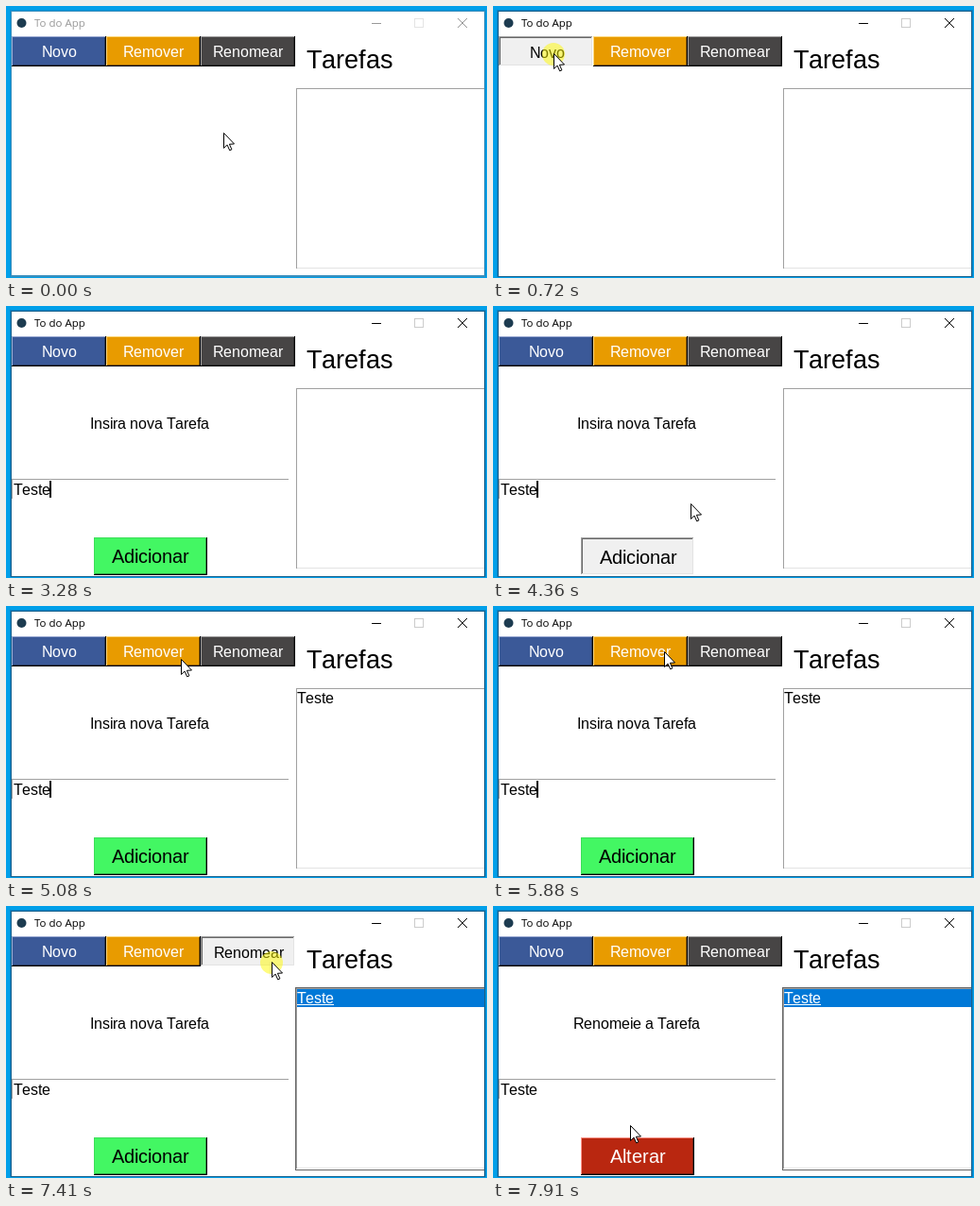
Animation of 509x288 px, one loop 8000 ms. Source, as an HTML page with a canvas:

```html
<!DOCTYPE html>
<html lang="pt">
<head>
<meta charset="utf-8">
<title>To do App</title>
<style>
html, body { margin: 0; width: 100%; height: 100%; overflow: hidden; background: #009fe9; }
canvas { display: block; width: 509px; height: 288px; }
</style>
</head>
<body>
<canvas id="stage" width="509" height="288"></canvas>
<script>
const ctx = document.getElementById('stage').getContext('2d');
const LOOP = 8000, TICK = 101.4;
const SANS = '"Liberation Sans", Arial, sans-serif';
const TITLE = '"Open Sans", "Noto Sans", sans-serif';

// All times below are in ticks
const CLICK = { add: 6, entry: 13, confirm: 42, list: 66, rename: 73 };
const TYPING = 22;
const HOME = { x: 230, y: 134 };
const MOVES = [
  { from: 0, to: 5, x: 64, y: 50 },
  { from: 8, to: 12, x: 150, y: 197 },
  { from: 30, to: 39, x: 188, y: 257 },
  { from: 42, to: 54, x: 181, y: 48, bow: 34 },
  { from: 58, to: 62, x: 259, y: 53 },
  { from: 62, to: 65, x: 330, y: 96 },
  { from: 67, to: 70, x: 281, y: 59 },
  { from: 74, to: 78, x: 145, y: 232 }
];

const within = (v, a, b) => v >= a && v <= b;
const clamp = (v, a, b) => Math.min(b, Math.max(a, v));
const easeOut = u => 1 - (1 - u) ** 3;
const isPressed = (k, click) => within(k, click, click + 1);
const isDone = (k, click) => k >= click + 2;

function pointer(k) {
  let { x, y } = HOME, resting = true;
  for (const m of MOVES) {
    if (k <= m.from) break;
    const u = clamp((k - m.from) / (m.to - m.from), 0, 1);
    const e = easeOut(u);
    x += (m.x - x) * e + (m.bow || 0) * Math.sin(Math.PI * e);
    y += (m.y - y) * e;
    resting = u === 1;
  }
  return { x: Math.round(x), y: Math.round(y), resting };
}

function rect(x, y, w, h, color) {
  ctx.fillStyle = color;
  ctx.fillRect(x, y, w, h);
}

function corner(x, y, w, h, topLeft, bottomRight) {
  rect(x, y, w, 1, topLeft);
  rect(x, y, 1, h, topLeft);
  rect(x, y + h - 1, w, 1, bottomRight);
  rect(x + w - 1, y, 1, h, bottomRight);
}

// Whole-pixel advances, as in hinted screen text
function advances(str, size) {
  const bias = size < 18 ? .3 : 0;
  ctx.font = `${size}px ${SANS}`;
  return [...str].map(c => Math.round(ctx.measureText(c).width - bias));
}

const textWidth = (str, size) => advances(str, size).reduce((a, b) => a + b, 0);

function text(str, x, y, size, color = '#000') {
  const steps = advances(str, size);
  ctx.fillStyle = color;
  [...str].forEach((c, i) => {
    ctx.fillText(c, x, y);
    x += steps[i];
  });
}

function centred(str, cx, y, size, color) {
  text(str, Math.round(cx - textWidth(str, size) / 2), y, size, color);
}

function disc(x, y, r, color) {
  ctx.fillStyle = color;
  ctx.beginPath();
  ctx.arc(x, y, r, 0, Math.PI * 2);
  ctx.fill();
}

// Bevel highlight: very bright faces get a darker edge, others a lighter one
function highlight(face) {
  const rgb = [1, 3, 5].map(i => parseInt(face.slice(i, i + 2), 16));
  const bright = rgb[1] > .95 * 255;
  const edge = rgb.map(v => bright ? v * .9 : Math.max(Math.min(255, v * 1.4), (v + 255) / 2));
  return `rgb(${edge.map(Math.round)})`;
}

function button(label, x, y, w, h, size, face, ink, pressed = false) {
  rect(x, y, w, h, pressed ? '#f0f0f0' : face);
  if (pressed) {
    corner(x + 1, y + 1, w - 2, h - 2, '#696969', '#e3e3e3');
    corner(x, y, w, h, '#a0a0a0', '#fff');
  } else {
    corner(x + 1, y + 1, w - 2, h - 2, face, 'rgba(0,0,0,.4)');
    corner(x, y, w, h, highlight(face), '#000');
  }
  const d = pressed ? 1 : 0;
  const baseline = Math.round(y + h / 2 + size * .36);
  centred(label, x + w / 2 + d, baseline + d, size, pressed ? '#000' : ink);
}

function line(color, x0, y0, x1, y1) {
  ctx.strokeStyle = color;
  ctx.lineWidth = 1;
  ctx.beginPath();
  ctx.moveTo(x0, y0);
  ctx.lineTo(x1, y1);
  ctx.stroke();
}

function drawWindow(active) {
  rect(0, 0, 509, 288, '#009fe9');
  rect(4, 4, 504, 283, active ? '#0585c8' : '#0593da');
  rect(5, 5, 502, 282, active ? '#17618d' : '#3a8fbd');
  rect(6, 6, 500, active ? 280 : 279, '#fff');
  const ink = active ? '#000' : '#999';
  disc(16.5, 18, 5, '#1c3b50');
  ctx.font = `11.5px ${TITLE}`;
  ctx.fillStyle = ink;
  ctx.fillText('To do App', 30, 22);
  rect(387, 18, 10, 1, ink);
  ctx.strokeStyle = active ? '#ccc' : '#e4e4e4';
  ctx.lineWidth = 1;
  ctx.strokeRect(432.5, 13.5, 9, 9);
  line(ink, 478, 13, 488, 23);
  line(ink, 488, 13, 478, 23);
}

function drawList(k) {
  const focused = k >= CLICK.list;
  text('Tarefas', 318, 66, 27);
  if (focused) {
    rect(306, 86, 200, 194, '#646464');
    rect(307, 87, 199, 192, '#fff');
  }
  rect(307, 87, 199, 1, '#a0a0a0');
  rect(307, 87, 1, 191, '#a0a0a0');
  rect(308, 277, 198, 1, '#e3e3e3');
  if (!isDone(k, CLICK.confirm)) return;
  if (focused) {
    rect(308, 88, 198, 19, '#0078d7');
    rect(308, 104, textWidth('Teste', 16), 1, '#fff');
  }
  text('Teste', 308, 103, 16, focused ? '#fff' : '#000');
}

function drawForm(k) {
  const rename = isDone(k, CLICK.rename);
  centred(rename ? 'Renomeie a Tarefa' : 'Insira nova Tarefa', 152, 130, 16);
  rect(6, 183, 293, 1, '#a0a0a0');
  rect(6, 183, 1, 21, '#a0a0a0');

  const count = k < TYPING ? 0 : clamp(k - TYPING - 1, 1, 5);
  const typed = 'Teste'.slice(0, count);
  text(typed, 8, 200, 16);
  const blinkOn = (k - CLICK.entry) % 9 < 6;
  if (within(k, CLICK.entry, CLICK.list - 1) && blinkOn) {
    rect(7 + textWidth(typed, 16), 185, 2, 18, '#000');
  }
  if (rename) button('Alterar', 93, 245, 120, 40, 20, '#b92710', '#fff');
  else button('Adicionar', 93, 245, 120, 40, 20, '#43f763', '#000', isPressed(k, CLICK.confirm));
}

function drawArrow(x, y) {
  const outline = [[0, 0], [0, 16], [3.6, 12.6], [6.2, 18.4], [8.4, 17.4], [5.9, 11.8], [11, 11.5]];
  ctx.beginPath();
  outline.forEach(([dx, dy]) => ctx.lineTo(x + .5 + dx, y + .5 + dy));
  ctx.closePath();
  ctx.fillStyle = '#fff';
  ctx.fill();
  ctx.strokeStyle = '#000';
  ctx.lineWidth = 1;
  ctx.stroke();
}

function drawBeam(x, y) {
  rect(x, y - 7, 1, 14, '#000');
  for (const dy of [-8, 7]) {
    rect(x - 3, y + dy, 3, 1, '#000');
    rect(x + 1, y + dy, 3, 1, '#000');
  }
}

function drawPointer(k) {
  if (within(k, 32, 36)) return;
  const { x, y, resting } = pointer(k);
  const beam = within(k, 9, 30) && within(y, 183, 205);
  const clicking = Object.values(CLICK).some(c => Math.abs(k - c) <= 1);
  if (clicking && resting) disc(x, y + 1, 12, 'rgba(255,250,0,.5)');
  (beam ? drawBeam : drawArrow)(x, y);
}

function draw(ms) {
  const k = Math.floor((ms + 2) / TICK);
  drawWindow(k >= CLICK.add);
  button('Novo', 6, 32, 100, 32, 16, '#3b5998', '#fff', isPressed(k, CLICK.add));
  button('Remover', 106, 32, 100, 32, 16, '#e89b00', '#fff');
  button('Renomear', 206, 32, 100, 32, 16, '#474545', '#fff', isPressed(k, CLICK.rename));
  if (isDone(k, CLICK.add)) drawForm(k);
  drawList(k);
  drawPointer(k);
}

const start = performance.now();
function loop() {
  draw((performance.now() - start) % LOOP);
  requestAnimationFrame(loop);
}
loop();
</script>
</body>
</html>
```
